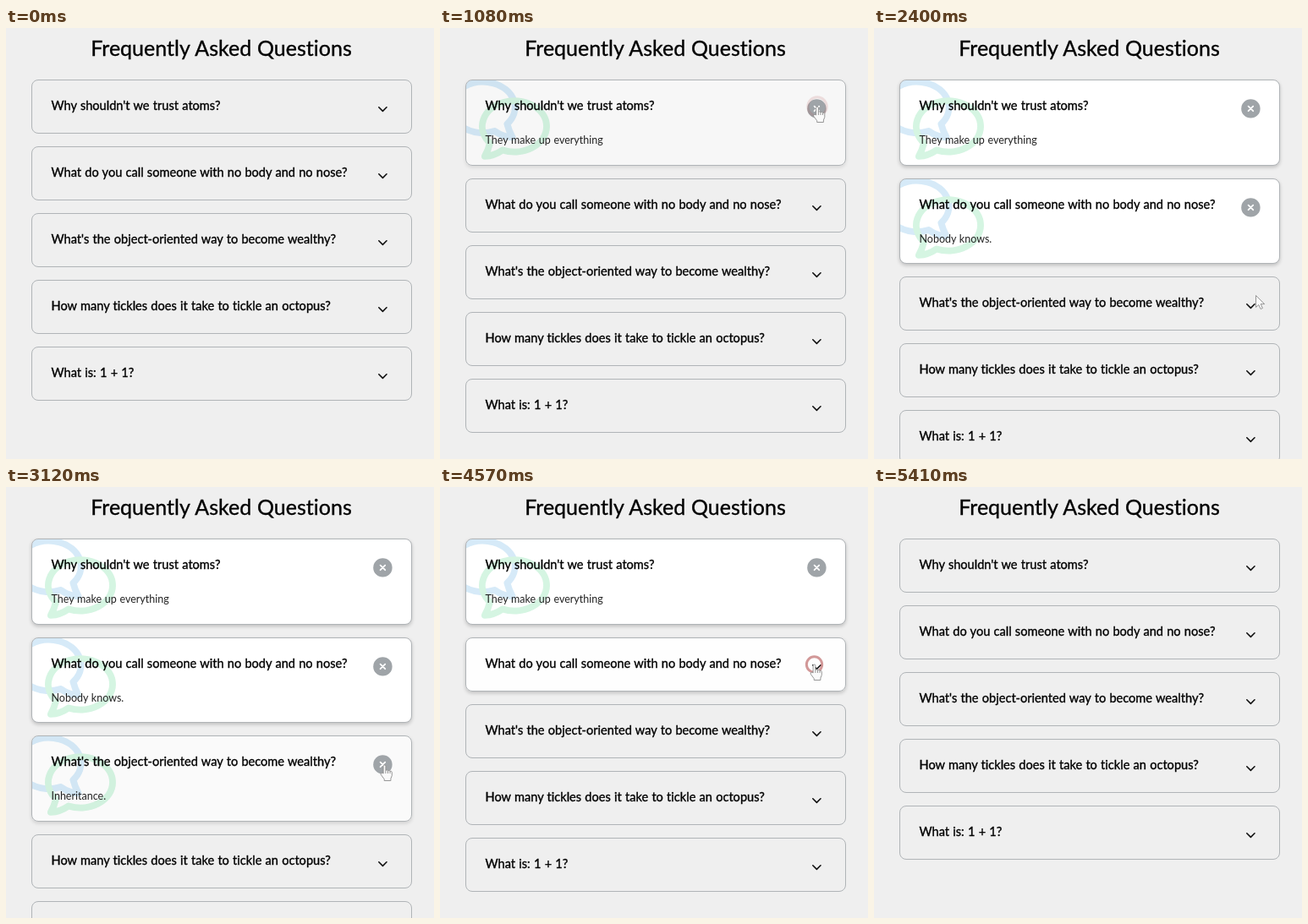
An HTML page that plays this animation: 506x510 px, repeating every 6.24 s.

```html
<!DOCTYPE html>
<html lang="en">
<head>
<meta charset="utf-8">
<title>Frequently Asked Questions</title>
<style>
  html, body { margin: 0; width: 100%; height: 100%; overflow: hidden; background: #efefef; }
  body {
    position: relative; color: #000; font-family: Lato, "Open Sans", sans-serif;
    font-variant-ligatures: none; word-spacing: .03em;
  }
  h1 {
    position: absolute; top: 8px; left: 0; width: 509px; margin: 0; text-align: center;
    font-size: 25px; line-height: 30px; font-weight: 400; -webkit-text-stroke: .35px #000;
  }
  .card {
    position: absolute; left: 30px; width: 450px; box-sizing: border-box; overflow: hidden;
    border: 1px solid #b0b4b7; border-radius: 8px;
  }
  .card svg { position: absolute; left: 0; top: 0; }
  .card p { position: absolute; left: 22.5px; margin: 0; line-height: 20px; white-space: nowrap; }
  .question { top: 20px; font-size: 14.6px; -webkit-text-stroke: .35px #000; }
  .answer { top: 61px; font-size: 12.5px; color: #222; }
  .open-only, .card.open .closed-only { visibility: hidden; }
  .card.open .open-only { visibility: visible; }
  #pointer { position: absolute; left: 0; top: 0; }
</style>
</head>
<body>
<h1>Frequently Asked Questions</h1>
<div id="cards"></div>
<svg id="pointer" width="506" height="510" fill="none">
  <circle id="ring" stroke="#b04a4a" stroke-width="3"/>
  <g id="cursor" fill="#fafafa" stroke="#8c8c8c" stroke-width=".9" stroke-linejoin="round">
    <path id="arrow" d="M0 0V14L3.3 11L5.6 16L7.9 15L5.7 10.1H10.2Z"/>
    <path id="hand" d="M-1.4 10V1.2Q-1.3 0 0 0T1.4 1.2V6.3Q2.8 5.2 4 6.7Q5.4 5.8 6.5 7.3Q8.5 6.6 8.8 8.6V12.5L7.4 16V18.5H-.3V16.7L-4.4 11.2Q-4.6 9 -2.8 9.2ZM1.4 6.3V10M4 6.7V10M6.5 7.3V10"/>
  </g>
</svg>
<script>
const LOOP = 6240, END = 5410, FADE = 300;
const TOP = 61, GAP = 15.1, CLOSED = 64, OPEN = 101.5;

// Opening and closing times in ms.
const items = [
  { question: "Why shouldn't we trust atoms?", answer: "They make up everything", open: 1000, close: 5210 },
  { question: "What do you call someone with no body and no nose?", answer: "Nobody knows.", open: 2040, close: 4565 },
  { question: "What's the object-oriented way to become wealthy?", answer: "Inheritance.", open: 3000, close: 3780 },
  { question: "How many tickles does it take to tickle an octopus?" },
  { question: "What is: 1 + 1?" }
];

const clicks = [1000, 2040, 3000, 3690, 4565, 5210];

// Pointer path: time, x, y.
const path = [
  [80, 254, 494], [160, 447, 99], [340, 447, 106], [560, 446, 80.5], [720, 446, 93],
  [1320, 446, 93], [1600, 444, 214], [1660, 444, 214], [1880, 444, 217],
  [2140, 444, 217], [2400, 451.5, 316.5], [2540, 451.5, 316.5], [2680, 449, 327],
  [2810, 449, 327], [2840, 447.5, 329], [4000, 447.5, 329], [4290, 443.5, 214],
  [4330, 442.5, 210], [4800, 442.5, 210], [5130, 446, 97], [END, 446, 97]
];

const byId = id => document.getElementById(id);
const clamp = v => Math.min(1, Math.max(0, v));
const easeOut = p => 1 - (1 - p) ** 2.3;
const smooth = p => p * p * (3 - 2 * p);
const fade = (t, start) => easeOut(clamp((t - start) / FADE));

const bubble = "M80 360A232 184 0 1 1 170 411Q110 453 42 456Q66 415 80 360Z";

const cards = items.map(({ question, answer = "" }) => {
  const card = document.createElement("div");
  card.className = "card";
  card.innerHTML = `
    <svg width="448" height="100" fill="none" stroke-linecap="round" stroke-linejoin="round">
      <g class="open-only" stroke-width="48" opacity=".2">
        <path d="${bubble}" stroke="#3498db" transform="translate(61.5 -7.5) scale(-.164 .164)"/>
        <path d="${bubble}" stroke="#2ecc71" transform="translate(15 15) scale(.164)"/>
      </g>
      <path class="closed-only" d="M409.8 31.8l4.6 4.6l4.6-4.6" stroke="#111" stroke-width="1.6"/>
      <g class="open-only">
        <circle cx="414.4" cy="33.4" r="11.2" fill="#9fa4a8"/>
        <path d="M411.6 30.6l5.6 5.6m0-5.6l-5.6 5.6" stroke="#fff" stroke-width="1.8"/>
      </g>
    </svg>
    <p class="question">${question}</p><p class="answer open-only">${answer}</p>`;
  byId("cards").append(card);
  return card;
});

function drawCards(t) {
  let y = TOP;
  return cards.map((card, i) => {
    const { open = Infinity, close = Infinity } = items[i];
    const top = y, isOpen = t >= open && t < close && t < END;
    const height = isOpen ? OPEN : CLOSED;
    const glow = t >= END ? 0 : fade(t, open) - fade(t, close);
    card.classList.toggle("open", isOpen);
    card.style.top = top + "px";
    card.style.height = height + "px";
    card.style.background = `rgba(255,255,255,${glow})`;
    card.style.boxShadow = `0 2px 4px rgba(0,0,0,${glow * .2})`;
    y += height + GAP;
    return top;
  });
}

function pointerAt(t) {
  const next = path.findIndex(point => point[0] > t);
  const [t0, x0, y0] = path[next - 1], [t1, x1, y1] = path[next];
  const p = smooth((t - t0) / (t1 - t0));
  return [x0 + (x1 - x0) * p, y0 + (y1 - y0) * p];
}

function drawPointer(t, tops) {
  const visible = t >= path[0][0] && t < END;
  byId("pointer").style.display = visible ? "" : "none";
  if (!visible) return;
  const [x, y] = pointerAt(t);
  const onToggle = x > 434 && x < 457 && tops.some(top => y > top + 22.5 && y < top + 45);
  byId("arrow").style.display = onToggle ? "none" : "";
  byId("hand").style.display = onToggle ? "" : "none";
  byId("cursor").setAttribute("transform", `translate(${x} ${y})`);

  const click = clicks.find(start => t >= start && t < start + 110);
  const age = click === undefined ? 1 : (t - click) / 110;
  const ring = byId("ring");
  ring.setAttribute("cx", x);
  ring.setAttribute("cy", y);
  ring.setAttribute("r", 9 + 3 * age);
  ring.setAttribute("opacity", .6 * (1 - age));
}

function frame() {
  const t = performance.now() % LOOP;
  drawPointer(t, drawCards(t));
  requestAnimationFrame(frame);
}
frame();
</script>
</body>
</html>
```
